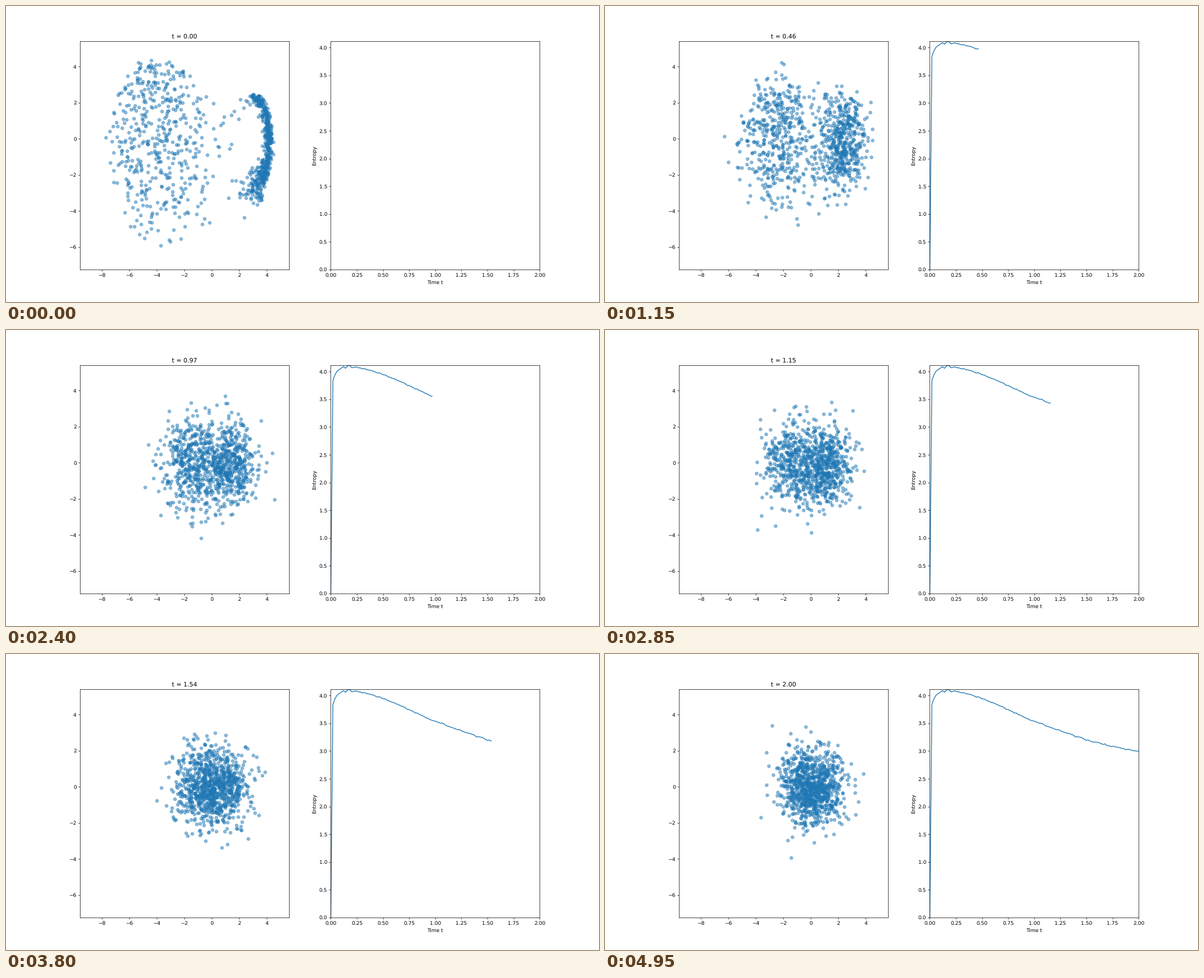
These frames come from a looping animation (1058x529 px, 5000 ms). A matplotlib script:

```python
import numpy as np
import matplotlib.pyplot as plt
from matplotlib.animation import FuncAnimation

FRAMES = 100
TIMES = np.linspace(0, 2, FRAMES)


def entropy_curve(rng):
    """Steep rise, short plateau, then a slow decline with sampling jitter."""
    steps = [0, 1, 2, 3, 6, 7, 8, 9, 10, 12, 20, 24, 33, 48, 60, 74, 85, 99]
    values = [0, 3.84, 3.945, 4.01, 4.09, 4.06, 4.105, 4.11, 4.07, 4.085,
              4.015, 3.955, 3.82, 3.56, 3.39, 3.205, 3.095, 2.99]
    frames = np.arange(FRAMES)
    jitter = np.where(frames > 12, rng.normal(0, 0.006, FRAMES), 0)
    return np.interp(frames, steps, values) + jitter


def wide_cluster(rng, n):
    y = 4.4 - 10.7 * rng.beta(1.5, 2.1, n)
    half_width = 4.1 * np.sqrt(1 - ((y + 0.9) / 5.7) ** 2)
    center = -3.8 + 0.25 * np.clip(-y - 2, 0, None)
    spread = 2 * rng.beta(1.7, 1.95, n) - 1
    return np.column_stack([center + half_width * spread, y])


def crescent(rng, n):
    angle = np.radians(rng.uniform(-75, 82, n))
    sine = np.sin(angle)
    low = np.clip(-sine - 0.4, 0, None)
    high = np.clip(sine - 0.8, 0, None)
    height = np.where(sine > 0, 2.65, 2.85)
    inward = rng.exponential(0.12 + 0.8 * low + 0.9 * high)
    x = 2.98 + 1.25 * np.cos(angle) + rng.normal(0, 0.13, n) - inward
    y = -0.2 + height * sine + rng.normal(0, 0.13 + 0.6 * low)
    return np.column_stack([x, y])


def bridge(rng, n):
    return rng.uniform((-1.2, -2.6), (2.5, 2.7), (n, 2))


def diffuse(i):
    """Ornstein-Uhlenbeck marginal, sampled independently at each time."""
    decay = np.exp(-TIMES[i])
    noise = np.random.default_rng(1000 + i).normal(size=START.shape)
    return decay * START + np.sqrt(1 - decay ** 2) * noise


rng = np.random.default_rng(7)
START = np.vstack([wide_cluster(rng, 460), crescent(rng, 510), bridge(rng, 30)])
ENTROPY = entropy_curve(rng)

plt.rcParams["text.hinting"] = "none"
fig, (cloud_ax, entropy_ax) = plt.subplots(1, 2, figsize=(16, 8), dpi=66.125)
cloud = cloud_ax.scatter(*START.T, alpha=0.5)
cloud_ax.set(xlim=(-9.59, 5.62), ylim=(-7.24, 5.39))
title = cloud_ax.set_title("t = 0.00")

line, = entropy_ax.plot([], [])
entropy_ax.set(xlim=(0, 2), ylim=(0, 4.11), xlabel="Time t", ylabel="Entropy")


def update(i):
    cloud.set_offsets(diffuse(i))
    title.set_text(f"t = {TIMES[i]:.2f}")
    line.set_data(TIMES[:i + 1], ENTROPY[:i + 1])
    return cloud, title, line


anim = FuncAnimation(fig, update, frames=FRAMES, interval=50, repeat=True,
                     repeat_delay=0, blit=False)
plt.show()
```
